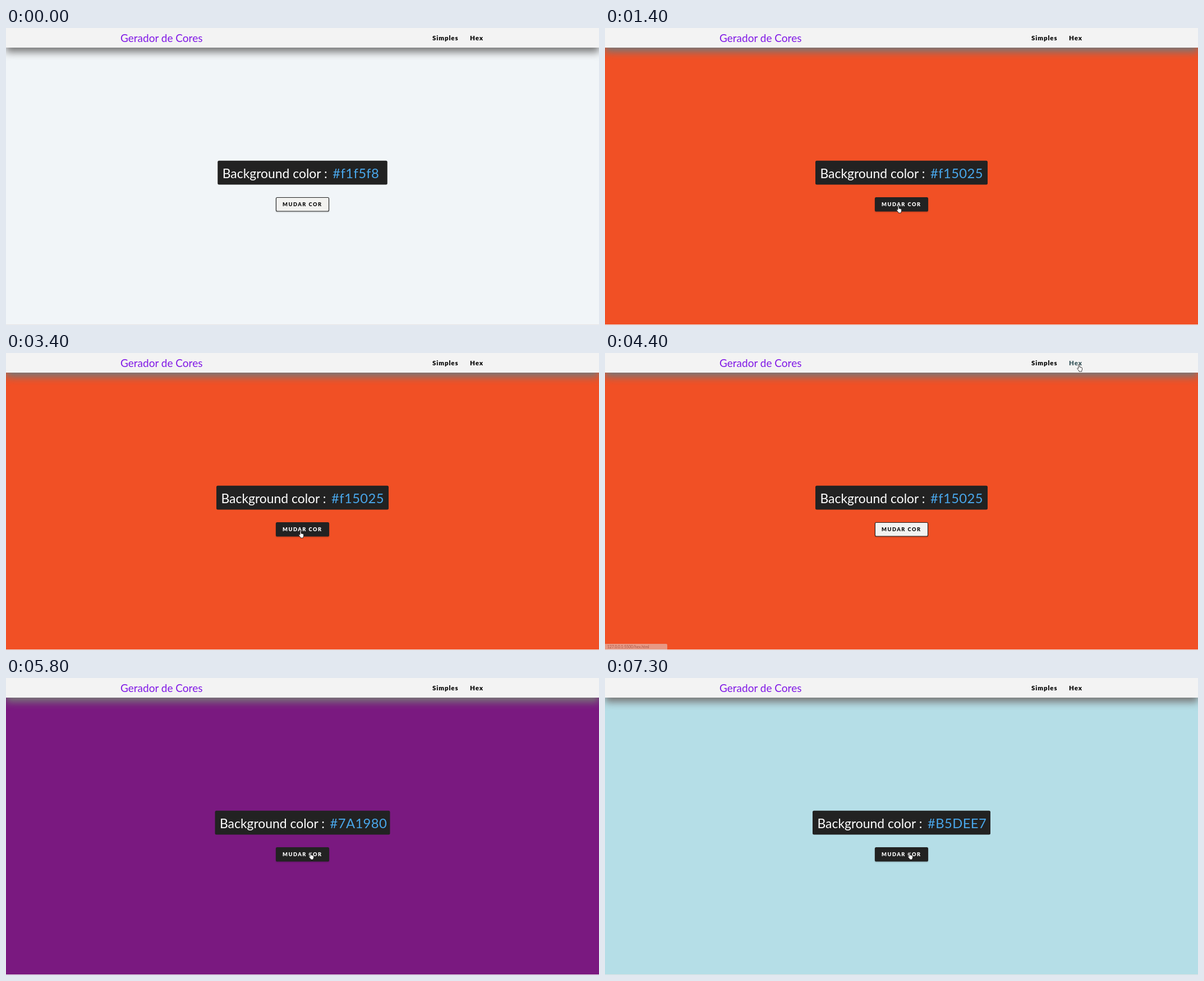
An HTML page that plays this animation: 1057x530 px, repeating every 8000 ms.

```html
<!DOCTYPE html>
<html lang="pt">
<head>
<meta charset="utf-8">
<title>Gerador de Cores</title>
<style>
  html, body { margin: 0; width: 100%; height: 100%; overflow: hidden; }
  svg { display: block; width: 1057px; height: 530px; font-family: Lato, sans-serif; }
  .shade { fill: #777; filter: blur(7px); }
  .nav { font-size: 11.5px; font-weight: 900; letter-spacing: .9px; }
  #label { font-size: 22.9px; }
  #value { font-size: 23.8px; letter-spacing: .4px; }
  #button { stroke: #222; stroke-width: 1.1; filter: drop-shadow(0 1px 1px rgba(0, 0, 0, .2)); }
  #action { font-size: 9.3px; font-weight: 900; letter-spacing: 1.5px; }
  #cursor path { fill: #fff; stroke: #111; stroke-width: .8; stroke-linejoin: round; }
</style>
</head>
<body>
<svg viewBox="0 0 1057 530">
  <rect id="page" width="1057" height="530"/>
  <rect y="529" width="1057" height="1" fill="#e6e3e3"/>
  <rect class="shade" y="8" width="1057" height="35"/>
  <rect width="1057" height="35" fill="#f3f3f3"/>
  <text x="204" y="24.5" font-size="19" fill="#8018e6">Gerador de Cores</text>
  <text class="nav" x="760" y="21.5">Simples</text>
  <text class="nav" id="link" x="827" y="21.5">Hex</text>

  <rect id="panel" y="236.8" height="42.6" rx="2.5" fill="#222"/>
  <text id="label" y="267.5" fill="#fff">Background color :</text>
  <text id="value" y="267.5" fill="#49a6e9"></text>

  <rect id="button" x="481.5" y="302.5" width="94" height="24.5" rx="2"/>
  <text id="action" x="493" y="318">MUDAR COR</text>

  <g id="status">
    <path d="M0 519H109q2 0 2 2V530H0z" fill="#dfe1e5"/>
    <text x="4" y="527" font-size="6.8" fill="#5f6368">127.0.0.1:5500/hex.html</text>
  </g>
  <g id="cursor">
    <path id="hand" d="M-1 7V1.2a1 1 0 0 1 2 0V5l3 .6q1.5.3 1.5 1.8V9q0 1.5-.8 2.6V13H0v-1L-2.8 8.6q-.7-1.1.2-1.7.8-.4 1.6.6z"/>
    <path id="arrow" d="M.5.5V10l2.2-2 1.5 3.5 1.6-.7L4.3 7.4h3z"/>
  </g>
</svg>
<script>
const $ = id => document.getElementById(id);
const set = (id, attrs) => {
  for (const name in attrs) $(id).setAttribute(name, attrs[name]);
};

// start time, colour text, panel width
const colors = [
  [0, '#f1f5f8', 302.5],
  [1100, '#f15025', 307],
  [1900, 'rgba(133,122,200)', 401.5],
  [3400, '#f15025', 307],
  [4700, '#f1f5f8', 302.5],
  [5800, '#7A1980', 312],
  [6500, '#3C9E5F', 314],
  [7300, '#B5DEE7', 317]
];
// time, x, y of the pointer tip
const path = [
  [200, 44, 8], [600, 502, 302], [700, 502, 302], [1100, 517.5, 317],
  [1200, 517.5, 317], [1400, 523, 317], [2900, 523, 317], [3000, 524, 317],
  [3100, 524, 317], [3200, 525, 317], [3500, 525, 317], [4400, 845, 20],
  [4800, 845, 20], [5700, 543, 311], [8000, 543, 311]
];
const ease = p => p * p * (3 - 2 * p);

function pointer(t) {
  const i = Math.max(1, path.findIndex(k => k[0] > t));
  const [t0, x0, y0] = path[i - 1], [t1, x1, y1] = path[i];
  const p = ease(Math.max(0, (t - t0) / (t1 - t0)));
  return [x0 + (x1 - x0) * p, y0 + (y1 - y0) * p];
}

function draw(now) {
  const t = Math.floor(now % 8000 / 100) * 100;
  const [, text, width] = colors.findLast(c => c[0] <= t);
  const left = 528.5 - width / 2;
  set('page', { fill: text });
  set('panel', { x: left, width });
  set('label', { x: left + 8.5 });
  set('value', { x: left + 205 });
  $('value').textContent = text;

  const [x, y] = pointer(t), shown = t >= 200;
  const onButton = shown && x > 481 && x < 576 && y > 302 && y < 328;
  const onLink = shown && x > 826 && x < 853 && y > 8 && y < 28;
  const onAny = onButton || onLink;
  set('button', { fill: onButton ? '#222' : '#f2f2f0' });
  set('action', { fill: onButton ? '#fff' : '#111' });
  set('link', { fill: onLink ? '#36545a' : '#000' });
  set('status', { opacity: onLink && t < 4700 ? (t < 4500 ? .5 : 1) : 0 });
  set('cursor', { transform: `translate(${x} ${y})`, opacity: +shown });
  set('hand', { opacity: +onAny });
  set('arrow', { opacity: +!onAny });
}

let start;
function tick(now) {
  start ??= now;
  draw(now - start);
  requestAnimationFrame(tick);
}
draw(0);
requestAnimationFrame(tick);
</script>
</body>
</html>
```
